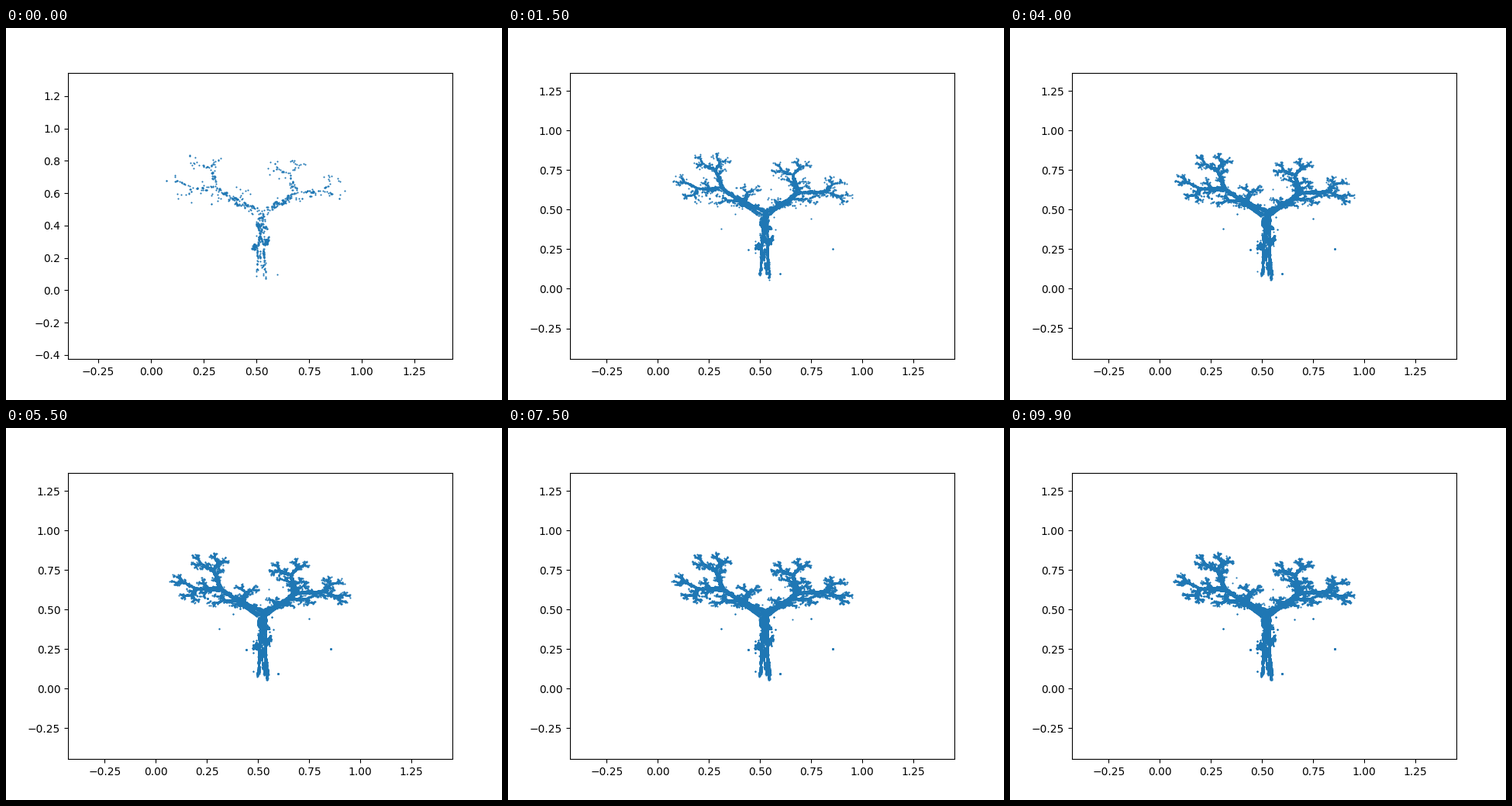
Animation of 640 by 480 pixels, one loop 10 s. Source, as a matplotlib script:

```python
import random

import matplotlib.pyplot as plt
import numpy as np
from matplotlib.animation import FuncAnimation

FRAMES, STEP_MS, RUN = 100, 100, 1000

# Tree maps: x' = a x + b y + e,  y' = c x + d y + f
MAPS = [
    (0.195, -0.488, 0.344, 0.443, 0.4431, 0.2452),
    (0.462, 0.414, -0.252, 0.361, 0.2511, 0.5692),
    (-0.637, 0.0, 0.0, 0.501, 0.8562, 0.2512),
    (-0.035, 0.07, -0.469, 0.022, 0.4884, 0.5069),
    (-0.058, -0.07, 0.453, -0.111, 0.5976, 0.0969),
]

# View box (x min, x max, y min, y max), easing open as the tree fills in.
VIEW_START = np.array([-0.3934, 1.43, -0.425, 1.3456])
VIEW_END = np.array([-0.4297, 1.4501, -0.4456, 1.366])
SETTLE = np.array([6, 6, 16, 16])


def run(rng, i):
    """One chaos-game path from the origin; its first two maps cycle with i."""
    n = len(MAPS)
    opening = [MAPS[(i - 1) % n], MAPS[i // n % n]]
    x = y = 0.0
    path = []
    for a, b, c, d, e, f in opening + rng.choices(MAPS, k=RUN - 2):
        x, y = a * x + b * y + e, c * x + d * y + f
        path.append((x, y))
    return path


rng = random.Random(7)
points = np.array([p for i in range(FRAMES) for p in run(rng, i)])

fig, ax = plt.subplots(figsize=(6.4, 4.8), dpi=100)
dots, = ax.plot([], [], "o", color="C0", ms=1.5, mew=0)


def update(i):
    x0, x1, y0, y1 = VIEW_START + (VIEW_END - VIEW_START) * np.minimum(i / SETTLE, 1)
    ax.set(xlim=(x0, x1), ylim=(y0, y1))
    dots.set_data(*points[:(i + 1) * RUN].T)
    return dots,


anim = FuncAnimation(fig, update, frames=FRAMES, interval=STEP_MS,
                     init_func=lambda: update(0), repeat=True,
                     repeat_delay=0, blit=False)
plt.show()
```
